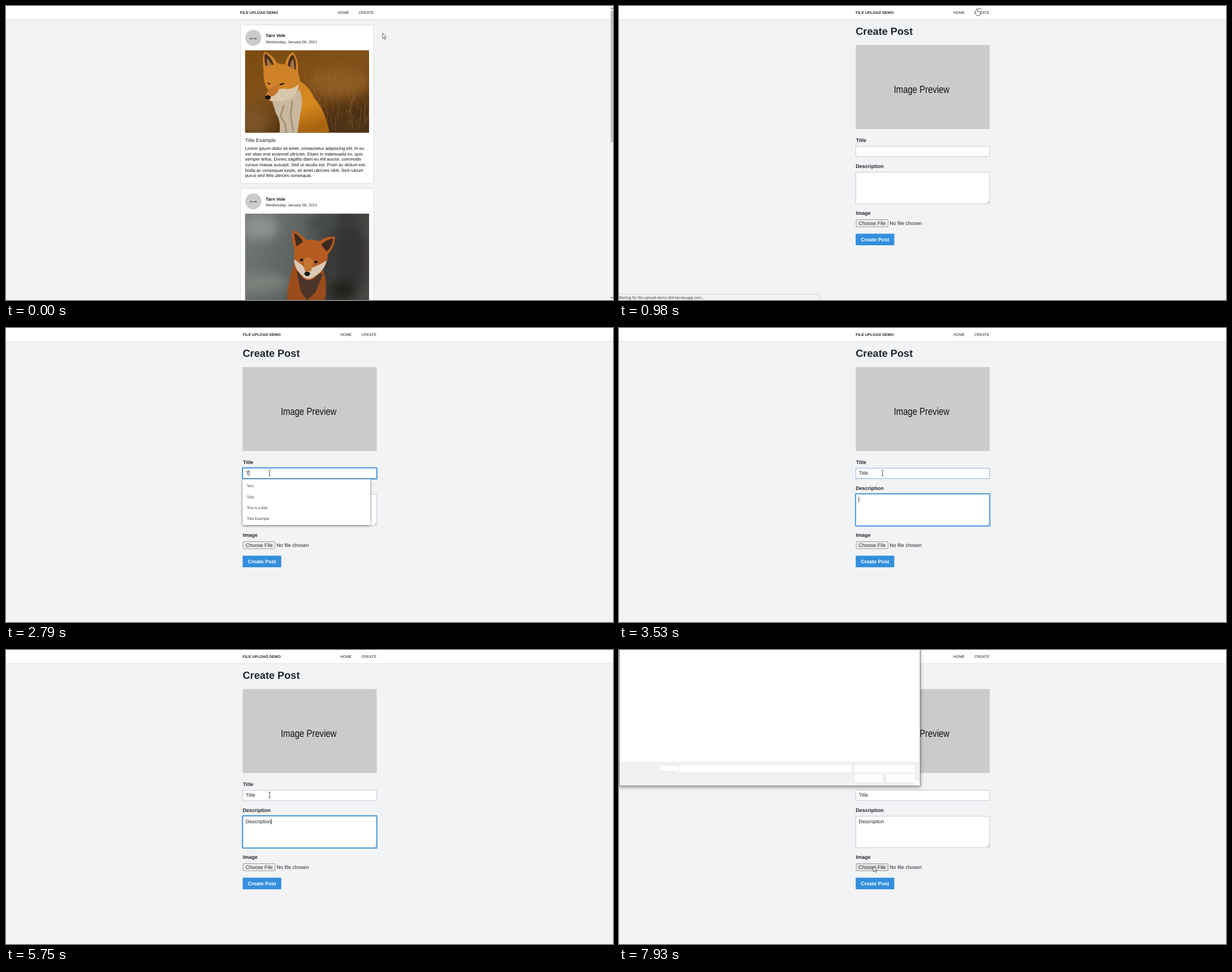
These frames come from a looping animation (1075 by 521 pixels, 8 s). An HTML page:

```html
<!DOCTYPE html>
<html lang="en">
<head>
<meta charset="utf-8">
<title>File upload demo</title>
<style>
  html, body { margin: 0; width: 100%; height: 100%; overflow: hidden; background: #f2f3f5; }
  svg { display: block; width: 1075px; height: 521px; }
  text { font: 9px "Liberation Sans", Arial, sans-serif; fill: #212529; text-rendering: geometricPrecision; white-space: pre; }
  .b { font-weight: bold; }
  .h1 { font-size: 18.2px; font-weight: bold; fill: #1d242b; }
  .sm { font-size: 7.875px; fill: #111; }
  .xs { font-size: 6.75px; }
  .ui { font: 6.36px "Open Sans", "Noto Sans", sans-serif; }
  .field { fill: #fff; stroke: #b9c2cf; stroke-width: .8; }
  .edge { fill: none; stroke: #6ea3e0; stroke-width: .9; }
  .ring { fill: none; stroke: #4299e1; stroke-width: 1.7; }
  .card { fill: #fff; stroke: #d6d9de; stroke-width: .9; }
  #list rect { fill: #fff; filter: drop-shadow(0 1.5px 2.5px rgba(0, 0, 0, .5)); }
  #dialog { transform-origin: 266px 120px; }
  #dialog .win { fill: #fff; stroke: #6e6e6e; filter: drop-shadow(0 2px 3px rgba(0, 0, 0, .4)); }
  .ptr { fill: #fff; stroke: #222; stroke-width: .7; stroke-linejoin: round; }
</style>
</head>
<body>
<svg viewBox="0 0 1075 521">
  <defs>
    <linearGradient id="meadow" x2=".5" y2="1">
      <stop stop-color="#7b4c10"/><stop offset=".5" stop-color="#80501a"/><stop offset="1" stop-color="#4c2f12"/>
    </linearGradient>
    <linearGradient id="mist" x2="1" y2=".25">
      <stop stop-color="#737a78"/><stop offset=".5" stop-color="#5c6260"/><stop offset=".75" stop-color="#383a38"/><stop offset="1" stop-color="#4b4a47"/>
    </linearGradient>
    <linearGradient id="coat" y2="1" x2=".3">
      <stop stop-color="#cf8126"/><stop offset=".6" stop-color="#d88a1d"/><stop offset="1" stop-color="#a8640f"/>
    </linearGradient>
    <filter id="soft"><feGaussianBlur stdDeviation="9"/></filter>
    <filter id="fur"><feGaussianBlur stdDeviation=".7"/></filter>
    <clipPath id="frame1"><path d="M423.5 78.5h219.5v146h-219.5z"/></clipPath>
    <clipPath id="frame2"><path d="M423.5 368h219.5v153h-219.5z"/></clipPath>
    <g id="author">
      <circle cx="438" cy="56.5" r="14.2" fill="#cbcbcb"/>
      <text x="438" y="58.6" text-anchor="middle" class="b" style="font-size:3.6px">80 x 80</text>
      <text x="460" y="55.4" class="sm b">Tarn Vole</text>
      <text x="460" y="65.6" class="xs">Wednesday, January 06, 2021</text>
    </g>
    <g id="nav">
      <path d="M-9 0h1100v24H-9z" fill="#fff"/>
      <path d="M-9 24.4h1100" stroke="#d9dbde"/>
      <text x="419.3" y="13.5" class="xs b">FILE UPLOAD DEMO</text>
      <text x="592" y="13.5" class="xs">HOME</text>
      <text x="629.2" y="13.5" class="xs">CREATE</text>
    </g>
  </defs>

  <g id="feed">
    <use href="#nav" x="-4.7"/>
    <rect class="card" x="415.2" y="33.6" width="236.3" height="280.6" rx="2.3"/>
    <use href="#author"/>
    <g clip-path="url(#frame1)">
      <path d="M423 78h221v147H423z" fill="url(#meadow)"/>
      <g filter="url(#soft)">
        <ellipse cx="590" cy="135" rx="55" ry="26" fill="#8d5a22"/>
        <ellipse cx="610" cy="205" rx="45" ry="24" fill="#4d3017"/>
        <ellipse cx="440" cy="205" rx="26" ry="25" fill="#7a5528"/>
      </g>
      <g id="grass" fill="none" stroke="#a8743a" stroke-width=".6" opacity=".55"></g>
      <g filter="url(#fur)">
        <path d="M508 128Q534 135 547 165Q566 185 573 226H490L482 170Z" fill="url(#coat)"/>
        <path d="M470 164Q500 152 520 148Q528 170 521 192L516 226H484Q488 205 478 190Z" fill="#c8b8a0"/>
        <path d="M492 176l-6 20 8 12 3 18M507 168l-3 25 5 30" fill="none" stroke="#8f7a62" stroke-width="3" opacity=".6"/>
        <path d="M456 113Q453 90 458 81Q472 86 480 101L494 104Q498 86 508 82Q519 93 517 117Q525 140 518 150Q504 166 483 169Q466 171 459 163Q459 157 465 150Q455 138 456 113Z" fill="#d08228"/>
        <path d="M460 106Q456 92 459 84Q470 90 474 104ZM499 106Q501 90 508 86Q515 96 513 113Z" fill="#49301d"/>
        <path d="M463 108Q461 98 463 93L471 104ZM503 108Q504 98 509 93L511 112Z" fill="#a8753f"/>
        <path d="M467 155Q480 148 490 146Q506 150 518 139Q519 154 504 164Q486 172 468 168Z" fill="#d9c7ac"/>
        <path d="M465 150Q477 135 484 145Q482 157 469 161Z" fill="#c0752a"/>
      </g>
      <path d="M463 135l6 3-4 1zM483 140q5-5 10-3-3 4-10 3z" fill="#241408"/>
      <ellipse cx="463.8" cy="162" rx="5" ry="4" fill="#1b1410"/>
    </g>
    <text x="423.5" y="240.6">Title Example</text>
    <g id="para"></g>

    <rect class="card" x="415.2" y="323.2" width="236.3" height="280" rx="2.3"/>
    <use href="#author" y="289.6"/>
    <g clip-path="url(#frame2)">
      <path d="M423 367h221v155H423z" fill="url(#mist)"/>
      <g filter="url(#soft)">
        <ellipse cx="450" cy="392" rx="32" ry="22" fill="#8b9290"/>
        <ellipse cx="450" cy="490" rx="50" ry="16" fill="#7d817c"/>
        <ellipse cx="560" cy="384" rx="26" ry="14" fill="#454a49"/>
        <ellipse cx="612" cy="450" rx="28" ry="65" fill="#343330"/>
        <ellipse cx="595" cy="505" rx="25" ry="20" fill="#24231f"/>
      </g>
      <g filter="url(#fur)">
        <path d="M511 455Q499 485 498 522H564Q571 493 561 466Z" fill="#9b4c1c"/>
        <path d="M515 470L522 506 533 521 548 508 561 475Z" fill="#4b3428"/>
        <path d="M507 397Q521 402 532 415Q545 412 555 417Q567 407 583 409Q583 426 570 440Q570 460 553 475Q544 487 534 486Q524 484 517 469Q507 461 511 430Q505 415 507 397Z" fill="#b65b20"/>
        <path d="M510 402Q520 407 526 418L514 426ZM579 412Q579 425 568 435L558 423Q567 414 579 412Z" fill="#3a2a22"/>
        <path d="M510 449Q523 457 528 463L533 470 541 464Q553 460 568 451Q563 470 547 479Q534 489 525 478Q511 467 510 449Z" fill="#d8c8b5"/>
        <path d="M527 450Q535 440 545 453L540 470H529Z" fill="#c57431"/>
      </g>
      <ellipse cx="523.5" cy="450" rx="3" ry="2.2" fill="#15100c"/>
      <ellipse cx="549" cy="453.5" rx="3" ry="2.2" fill="#15100c"/>
      <ellipse cx="533.5" cy="474.5" rx="5" ry="4" fill="#17120f"/>
    </g>
    <path d="M1070 0h5v521h-5z" fill="#f1f1f1"/>
    <path d="M1071 8.5h4V241h-4z" fill="#c1c1c1"/>
    <path d="M1071 5l1.8-2.5L1074.600 5zM1071 516l1.800 2.500 1.800-2.500z" fill="#505050"/>
  </g>

  <g id="form">
    <use href="#nav"/>
    <text x="419.2" y="51" class="h1">Create Post</text>
    <path d="M419.200 69.300h237.300V218H419.200z" fill="#cbcbcb"/>
    <g transform="translate(536 153.500) scale(.82 1)">
      <text text-anchor="middle" style="font-size:18.200px;fill:#111">Image Preview</text>
    </g>
    <text x="419.700" y="240.500" class="b">Title</text>
    <text x="419.300" y="286.600" class="b">Description</text>
    <text x="419.500" y="370.400" class="b">Image</text>
    <g id="title">
      <rect class="field" x="419.500" y="248.400" width="236.700" height="18.400"/>
      <rect class="edge" x="419.500" y="248.400" width="236.700" height="18.400"/>
      <rect class="ring" x="418.700" y="247.500" width="238.300" height="20.200" rx=".8"/>
      <text x="424.500" y="260.300"></text>
      <rect class="caret" y="252" width=".8" height="10"/>
    </g>
    <g id="desc">
      <rect class="field" x="419.500" y="294.500" width="236.700" height="55.800"/>
      <path d="M651 349.500l4.500-4.500M653.500 349.500l2-2" stroke="#777" stroke-width=".6"/>
      <rect class="edge" x="419.500" y="294.500" width="236.700" height="55.800"/>
      <rect class="ring" x="418.700" y="293.700" width="238.300" height="57.400" rx=".8"/>
      <text x="424.500" y="307.200"></text>
      <rect class="caret" y="299" width=".8" height="10"/>
    </g>
    <rect id="choose" x="420" y="378.600" width="56.500" height="12.600" rx="1" stroke="#767676" stroke-width=".7"/>
    <text x="424.300" y="388">Choose File</text>
    <text x="479.300" y="388">No file chosen</text>
    <rect x="419.200" y="403.600" width="68.300" height="20.300" rx=".6" fill="#338fdd"/>
    <text x="428.300" y="416.700" class="b" style="fill:#fff">Create Post</text>
    <g id="list"><rect x="419.200" y="268" width="225.800"/></g>
  </g>

  <g id="status">
    <rect x="-2" y="510.500" width="358.500" height="14" rx="1.500" fill="#f2f2f2" stroke="#cfd1d3" stroke-width=".8"/>
    <text x="-.5" y="518.700" class="ui"></text>
  </g>

  <g id="dialog">
    <path class="win" d="M.5 -3H533.300V240.800H.5z"/>
    <path d="M1 198H533V240.300H1z" fill="#f0f0f0"/>
    <path d="M74 205.500h30.500v8.500H74zM107 203.500h304V217H107zM417.500 203.500H524V217H417.500zM417.500 220H467v14.500H417.500zM473.500 220H524v14.500H473.500zM524 232h9v8.300h-9z" fill="#fff"/>
  </g>

  <circle id="click" r="6" fill="#ffe21f" opacity=".75"/>
  <g id="cursor">
    <path id="arrow" class="ptr" d="M0 0V9.500L2.200 7.500 3.800 11 5.300 10.300 3.800 6.900H6.700Z"/>
    <path id="hand" class="ptr" d="M-1 .2Q0-.8 1 .2V4L5.500 5Q6.500 5.500 6.300 7L5.300 12H-.2L-3.300 7.800Q-3-.3+9 -1 7.800Z"/>
    <path id="beam" d="M-1.800-5H-.4L0-4.600.4-5H1.800M-1.800 5H-.4L0 4.600.4 5H1.800M0-4.600V4.600" fill="none" stroke="#222" stroke-width=".8"/>
  </g>
</svg>
<script>
const LOOP = 8000;
const $ = id => document.getElementById(id);
const show = (el, on) => { el.style.display = on ? '' : 'none'; };
const ramp = (t, a, b) => Math.min(1, Math.max(0, (t - a) / (b - a)));
const within = (t, a, b) => t >= a && t < b;
const last = (steps, t) => steps.filter(s => s[0] <= t).pop();

function addText(parent, x, y, cls, str = '') {
  const el = document.createElementNS('http://www.w3.org/2000/svg', 'text');
  el.setAttribute('x', x);
  el.setAttribute('y', y);
  el.setAttribute('class', cls);
  el.textContent = str;
  parent.append(el);
  return el;
}

[
  'Lorem ipsum dolor sit amet, consectetur adipiscing elit. In eu',
  'est vitae erat euismod ultricies. Etiam in malesuada ex, quis',
  'semper tellus. Donec sagittis diam eu elit auctor, commodo',
  'cursus massa suscipit. Sed ut iaculis est. Proin ac dictum est.',
  'Nulla ac consequat turpis, sit amet ultricies nibh. Sed rutrum',
  'purus sed felis ultrices consequat.'
].forEach((line, i) => addText($('para'), 423.5, 255.2 + 9.6 * i, 'sm', line));

// Seeded blades of dry grass
let seed = 7;
const rnd = () => (seed = seed * 16807 % 2147483647) / 2147483647;
const blades = document.createElementNS('http://www.w3.org/2000/svg', 'path');
blades.setAttribute('d', Array.from({ length: 70 }, () =>
  `M${530 + rnd() * 115} ${125 + rnd() * 100}q${rnd() * 8 - 4}-12 ${rnd() * 24 - 12}-${12 + rnd() * 22}`).join(''));
$('grass').append(blades);

const hints = ['Test', 'Title', 'This is a title', 'Title Example', 'Example', 'Post'];
const rows = hints.map((_, i) => addText($('list'), 426.5, 282.3 + 19.2 * i, 'ui'));
const menus = [
  [0, []], [2180, hints], [2790, hints.slice(0, 4)],
  [2880, ['Title', 'Title Example']], [3430, []]
];

const typed = {
  title: [[0, ''], [2130, ''], [2790, 'T'], [2880, 'Ti'], [2970, 'Tit'], [3120, 'Titl'], [3200, 'Title']],
  desc: [[0, ''], [3430, ''], [3760, 'D'], [3940, 'De'], [3990, 'Des'], [4040, 'Desrc'], [4220, 'Desrci'],
    [4500, 'Desrc'], [4600, 'Des'], [4730, 'Desc'], [5190, 'Descr'], [5300, 'Descri'], [5420, 'Descrip'],
    [5570, 'Descript'], [5630, 'Descripti'], [5690, 'Descriptio'], [5750, 'Description']]
};

function drawField(id, t, focus, blur) {
  const box = $(id), [since, str] = last(typed[id], t);
  const text = box.querySelector('text'), caret = box.querySelector('.caret');
  text.textContent = str;
  caret.setAttribute('x', 424.4 + (str ? text.getComputedTextLength() : 0));
  show(caret, within(t, focus, blur) && (t - since) % 1020 < 510);
  const on = ramp(t, focus - 30, focus + 90);
  box.querySelector('.ring').style.opacity = on * (1 - ramp(t, blur, blur + 70));
  box.querySelector('.edge').style.opacity = on * (1 - ramp(t, blur + 50, blur + 180));
}

// Pointer path: time, x, y
const path = [
  [0, 667, 48], [50, 667, 48], [120, 650, 25], [200, 633.7, 5], [1340, 633.7, 5], [1600, 598, 95],
  [1800, 557, 163], [1950, 515, 196], [2130, 466.8, 257], [6580, 466.8, 257], [6850, 464, 295],
  [7100, 456, 356], [7290, 450.3, 383.3], [LOOP, 450.3, 383.3]
];

function drawPointer(t) {
  const i = path.findIndex(p => p[0] > t);
  const [t0, x0, y0] = path[i - 1], [t1, x1, y1] = path[i];
  const k = ramp(t, t0, t1), x = x0 + (x1 - x0) * k, y = y0 + (y1 - y0) * k;
  const onLink = x > 624 && x < 657 && y < 18;
  const onField = within(y, 248, 267) || within(y, 294, 351);
  $('cursor').setAttribute('transform', `translate(${x} ${y})`);
  show($('hand'), onLink);
  show($('beam'), onField);
  show($('arrow'), !onLink && !onField);
  $('click').setAttribute('cx', x);
  $('click').setAttribute('cy', y + 1.5);
  show($('click'), within(t, 200, 260) || within(t, 2140, 2280) || within(t, 7290, 7410));
}

function draw(t) {
  show($('feed'), t < 980);
  show($('form'), t >= 980);
  show($('status'), within(t, 160, 1360));
  $('status').lastElementChild.textContent = t < 620
    ? 'https://file-upload-demo-264.herokuapp.com/create'
    : 'Waiting for file-upload-demo-264.herokuapp.com...';

  drawField('title', t, 2180, 3430);
  drawField('desc', t, 3450, 7280);

  const items = last(menus, t)[1];
  show($('list'), items.length);
  $('list').firstElementChild.setAttribute('height', 4.4 + 19.2 * items.length);
  rows.forEach((row, i) => { row.textContent = items[i] || ''; });

  $('choose').setAttribute('fill', t < 7200 ? '#efefef' : within(t, 7290, 7410) ? '#f5f5f5' : '#e3e3e3');

  const open = ramp(t, 7690, 7920);
  show($('dialog'), open > 0);
  $('dialog').style.opacity = open;
  $('dialog').style.transform = `scale(${.9 + .1 * (1 - (1 - open) ** 2)})`;
  drawPointer(t);
}

const start = performance.now();
(function tick() {
  draw((performance.now() - start) % LOOP);
  requestAnimationFrame(tick);
})();
</script>
</body>
</html>
```
